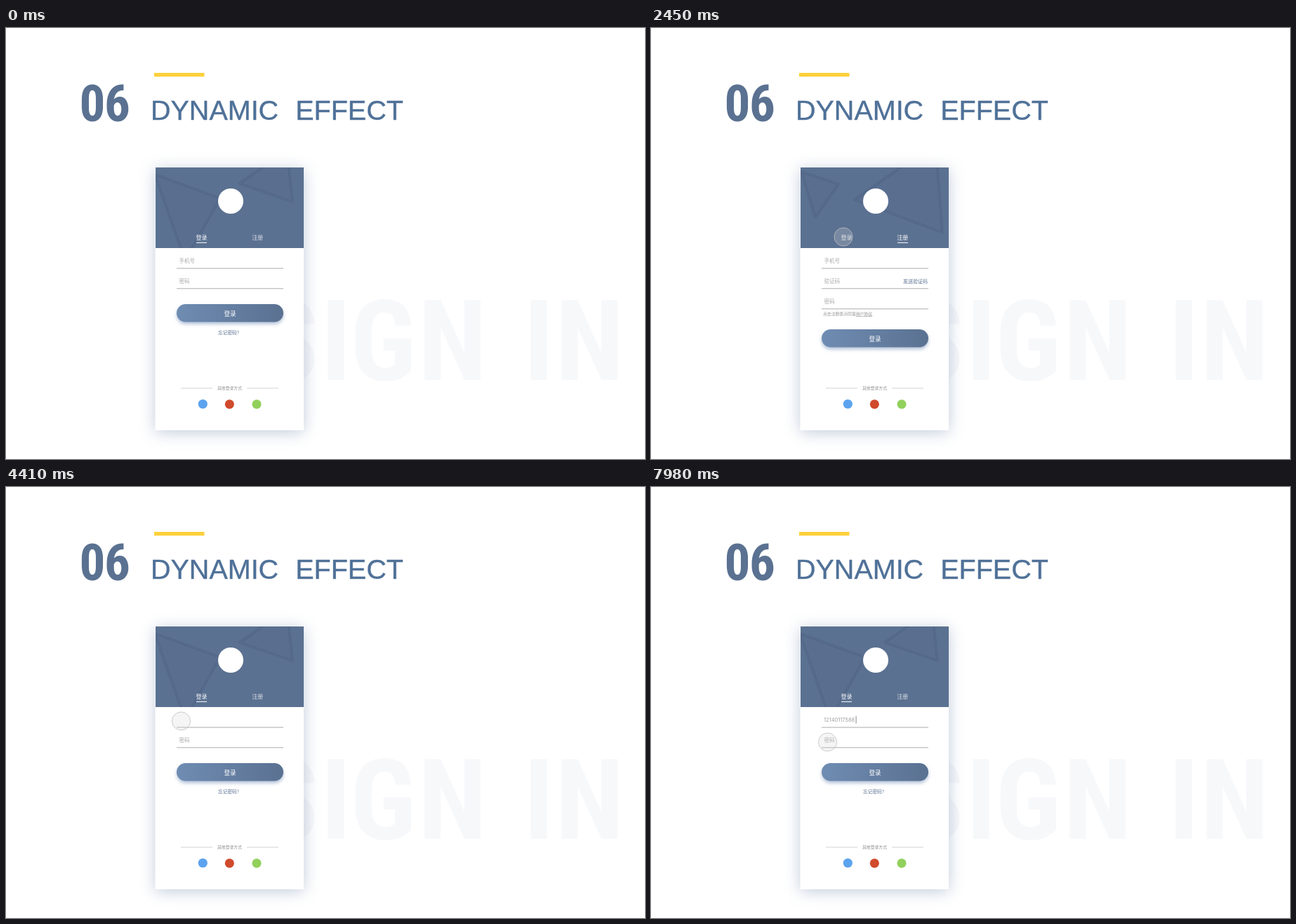
Animation of 910 by 615 pixels, one loop 8000 ms. Source, as an HTML page:

```html
<!DOCTYPE html>
<html lang="zh-CN">
<head>
<meta charset="utf-8">
<title>Dynamic effect</title>
<style>
  html, body { margin: 0; width: 100%; height: 100%; overflow: hidden; background: #fff; }
  svg { display: block; width: 100vw; height: 100vh; }
  text { font-family: "Noto Sans CJK SC", "Noto Sans CJK", "Noto Sans", sans-serif; }
  .number, .ghost { font-family: "Roboto Condensed", Roboto, "Liberation Sans", sans-serif; font-weight: 900; font-stretch: 75%; }
  .number { font-size: 73px; letter-spacing: -1.5px; fill: #5a7191; }
  .ghost { font-size: 160px; fill: #f7f8fa; }
  .title { font: 400 39.5px "Liberation Sans", Arial, sans-serif; fill: #4f7198; stroke: #4f7198; stroke-width: .4; }
  .mid { text-anchor: middle; }
  .card { fill: #fff; filter: drop-shadow(0 3px 11px rgba(84, 112, 158, .36)); }
  .facet { fill: rgba(70, 93, 130, .07); stroke: rgba(62, 82, 116, .32); stroke-width: 3.4; stroke-linejoin: round; }
  .facet.thin { fill: none; stroke: rgba(122, 143, 174, .25); stroke-width: 1; }
  .tab { font-size: 8px; fill: #fff; }
  .hint { font-size: 7.5px; fill: #a9a9a9; }
  .typed { font: 400 7.5px Inter, sans-serif; fill: #a0a0a0; }
  .rule { stroke: #c6c7c9; stroke-width: 1.4; }
  .fine { stroke: #cfcfcf; stroke-width: .9; }
  .small { font-size: 5.85px; fill: #8f8f8f; }
  .link { fill: #5a7191; }
  .pill { fill: url(#pill); filter: drop-shadow(0 3px 2.5px rgba(100, 130, 175, .5)); }
  .touch { fill: rgba(215, 215, 215, .24); stroke: rgba(190, 192, 194, .8); stroke-width: 1; }
</style>
</head>
<body>
<svg viewBox="0 0 910 615">
  <defs>
    <linearGradient id="pill">
      <stop offset="0" stop-color="#6f8cb2"/>
      <stop offset="1" stop-color="#5a7191"/>
    </linearGradient>
    <clipPath id="headClip"><rect x="213" y="199" width="211" height="115"/></clipPath>
    <clipPath id="cardClip"><rect x="213" y="199" width="211" height="375"/></clipPath>
  </defs>

  <rect x="211" y="64" width="71.5" height="5.4" fill="#fdd03b"/>
  <text class="number mid" x="140" y="133">06</text>
  <text class="title" x="206" y="131">DYNAMIC</text>
  <text class="title" x="412.2" y="131">EFFECT</text>
  <g id="ghost"></g>

  <rect class="card" x="212.5" y="199" width="211.5" height="375"/>
  <g clip-path="url(#headClip)">
    <rect x="213" y="199" width="211" height="115" fill="#5b7191"/>
    <g id="facets"></g>
  </g>
  <circle cx="320" cy="247" r="18" fill="#fff"/>
  <text class="tab" id="loginTab" x="270.5" y="301.5">登录</text>
  <text class="tab" id="joinTab" x="350.3" y="301.5">注册</text>
  <rect id="underline" x="271" y="305.8" width="15" height="1" fill="#fff"/>

  <text class="hint" id="phoneHint" x="246.5" y="335">手机号</text>
  <text class="typed" id="typed" x="246" y="334.9"></text>
  <rect id="caret" y="326.5" width="1" height="11" fill="#8c8c8c"/>
  <path class="rule" d="M243 343H395M243 371.8H395"/>

  <g id="loginForm">
    <text class="hint" x="246.5" y="364">密码</text>
    <text class="link mid" font-size="6.7" x="317" y="437.3">忘记密码?</text>
  </g>
  <g id="joinForm">
    <text class="hint" x="246.5" y="364">验证码</text>
    <text class="link" font-size="7" x="359" y="363.8">发送验证码</text>
    <text class="hint" x="246.5" y="393">密码</text>
    <path class="rule" d="M243 400.7H395"/>
    <text class="small" x="245" y="410">点击注册表示同意<tspan text-decoration="underline">用户协议</tspan></text>
  </g>

  <g id="button">
    <rect class="pill" x="243" y="394" width="152" height="25.4" rx="12.7"/>
    <text class="mid" font-size="8.6" fill="#fff" x="319" y="410.8">登录</text>
  </g>

  <path class="fine" d="M249 514H294M343 514H388"/>
  <text class="small mid" x="318.5" y="516.2">其他登录方式</text>
  <circle cx="280.3" cy="536.5" r="6.6" fill="#5ca3ef"/>
  <circle cx="318.3" cy="536.8" r="6.6" fill="#d04a2c"/>
  <circle cx="357" cy="536.8" r="6.6" fill="#92d05c"/>

  <g clip-path="url(#cardClip)"><circle class="touch" id="touch"/></g>
</svg>

<script>
const LOOP = 8000, STEP = 70;
const NUMBER = "12140117588";
const TYPE_START = 4939, TYPE_GAP = 187;
const JOIN_AT = 1330, LOGIN_AT = 2696, SWITCH = 420;
const PHONE_TAP = 4200;

const $ = id => document.getElementById(id);
const clamp = v => Math.min(1, Math.max(0, v));
const mix = (a, b, p) => a + (b - a) * p;
const easeOut = u => 1 - Math.pow(1 - clamp(u), 1.4);
const easeInOut = u => u * u * (3 - 2 * u);

function add(parent, tag, cls) {
  const el = document.createElementNS("http://www.w3.org/2000/svg", tag);
  el.setAttribute("class", cls);
  return parent.appendChild(el);
}

// Large pale letters: glyph and centre
[["S", 402], ["I", 470], ["G", 537], ["N", 636], ["I", 759], ["N", 831]].forEach(([glyph, x]) => {
  const el = add($("ghost"), "text", "ghost mid");
  el.setAttribute("x", x);
  el.setAttribute("y", 502);
  el.textContent = glyph;
});

// Header triangles: corners for the login and the join state
const facets = [
  { login: [212, 209, 305, 243, 255, 332], join: [214, 205, 267, 223, 234, 270] },
  { login: [333, 222, 400, 174, 408, 248], join: [290, 245, 405, 164, 415, 292] }
].map(f => ({ ...f, els: ["facet", "facet thin"].map(c => add($("facets"), "polygon", c)) }));

// Touch point: time, x, y
const path = [
  [0, 438, 430], [840, 356.5, 298], [2030, 356.5, 298], [2450, 274, 298],
  [3570, 274, 298], [4060, 249.5, 334], [4620, 249.5, 334], [5460, 329, 361],
  [7210, 329, 361], [7980, 251.5, 364], [LOOP, 251.5, 364]
];
const taps = [1155, 2660, 4270];

function touchAt(t) {
  const i = path.findIndex(k => k[0] > t);
  const [t0, x0, y0] = path[i - 1], [t1, x1, y1] = path[i];
  const p = easeInOut((t - t0) / (t1 - t0));
  return [mix(x0, x1, p), mix(y0, y1, p)];
}

function draw(t) {
  const join = easeOut((t - JOIN_AT) / SWITCH) - easeOut((t - LOGIN_AT) / SWITCH);
  const joining = t > JOIN_AT && t < LOGIN_AT;

  facets.forEach(f => {
    const points = f.login.map((v, i) => mix(v, f.join[i], join)).join(" ");
    f.els.forEach(el => el.setAttribute("points", points));
  });
  $("underline").setAttribute("x", mix(271, 351, join));
  $("button").setAttribute("transform", `translate(0 ${36 * join})`);
  $("loginTab").style.opacity = mix(1, .85, join);
  $("joinTab").style.opacity = mix(.78, 1, join);
  $("loginForm").style.display = joining ? "none" : "";
  $("joinForm").style.display = joining ? "" : "none";

  const count = Math.max(0, Math.min(NUMBER.length, Math.floor((t - TYPE_START) / TYPE_GAP)));
  $("typed").textContent = NUMBER.slice(0, count);
  $("phoneHint").style.display = t < PHONE_TAP ? "" : "none";
  $("caret").style.display = t < TYPE_START ? "none" : "";
  $("caret").setAttribute("x", 247.3 + (count ? $("typed").getComputedTextLength() : 0));

  const [x, y] = touchAt(t);
  const press = Math.max(...taps.map(tap => clamp(1 - Math.abs(t - tap) / 140)));
  $("touch").setAttribute("cx", x);
  $("touch").setAttribute("cy", y);
  $("touch").setAttribute("r", 13 - 1.8 * press);
}

const start = performance.now();
function tick() {
  const t = (performance.now() - start) % LOOP;
  draw(Math.floor(t / STEP) * STEP);
  requestAnimationFrame(tick);
}
tick();
</script>
</body>
</html>
```
